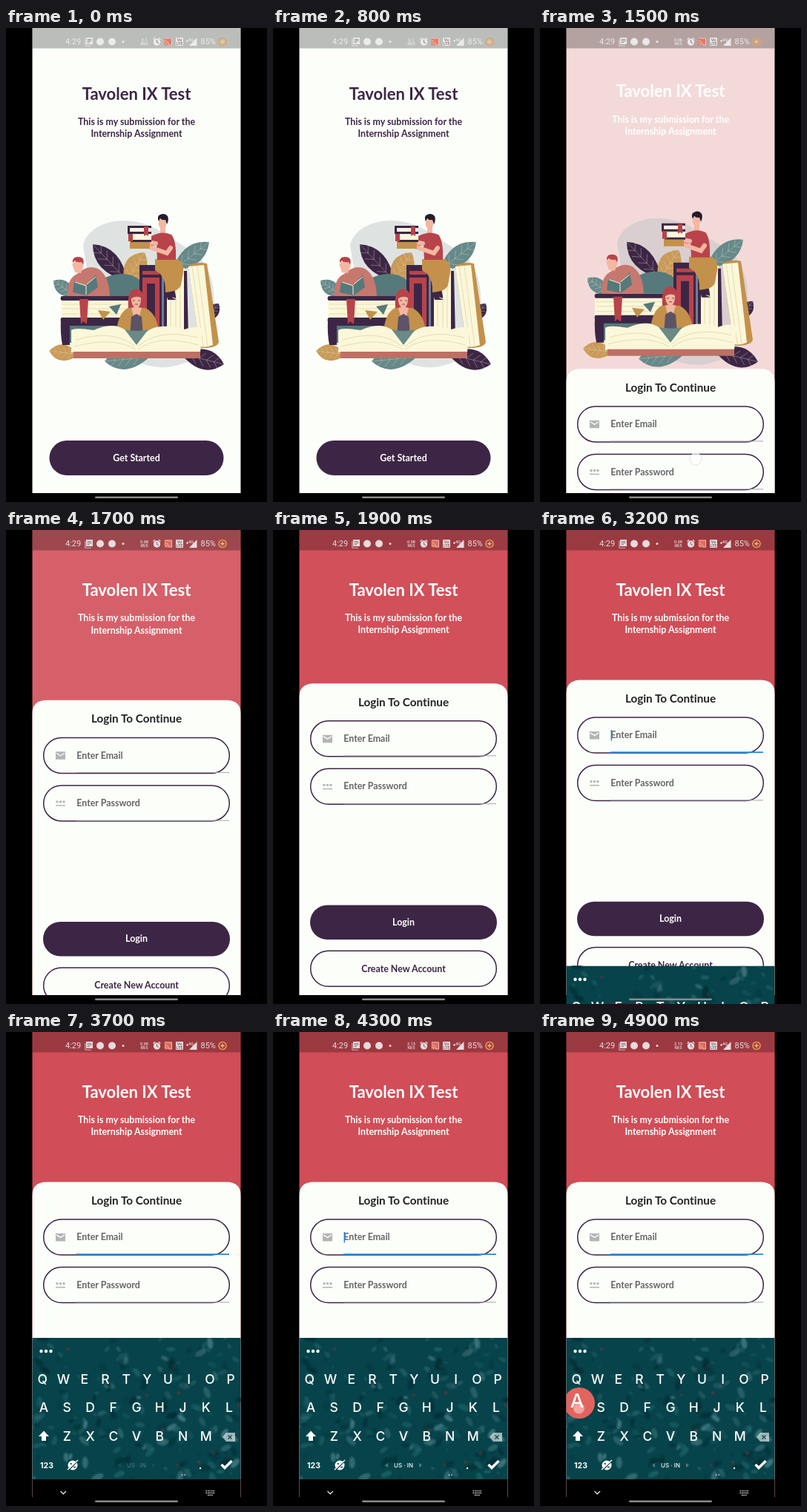
Recreate the animation shown at these times as an HTML page. Size 352 px wide and 640 px high, loop 5000 ms.

```html
<!DOCTYPE html>
<html lang="en">
<head>
<meta charset="utf-8">
<title>Login screen</title>
<style>
html, body { margin: 0; width: 100%; height: 100%; overflow: hidden; background: #000; }
svg { display: block; width: 100%; height: 100%; }
text { font: 700 12.4px Lato, sans-serif; text-anchor: middle; font-variant-ligatures: none; }
.box { fill: none; stroke: #3d2645; stroke-width: 1.5; }
.hint { fill: #666; text-anchor: start; }
.icon { fill: #b4b4b4; }
#status text { font: 400 11px Roboto, sans-serif; text-anchor: start; }
#status text.tiny { font: 500 5.5px Roboto, sans-serif; text-anchor: middle; }
#keys text { font: 500 17.5px Inter, sans-serif; }
.p { fill: #3d2645; } .t { fill: #56797b; } .c { fill: #fbf7da; }
.r { fill: #b8434b; } .o { fill: #c3914b; } .s { fill: #f3b7a2; }
.line { fill: none; stroke: #d9c98f; stroke-width: .6; }
</style>
</head>
<body>
<svg viewBox="0 0 352 640">
  <clipPath id="app"><rect x="35.5" width="281" height="628"/></clipPath>
  <clipPath id="wide"><rect x="35.5" width="281" height="640"/></clipPath>
  <filter id="soft"><feGaussianBlur stdDeviation="1.3"/></filter>

  <g clip-path="url(#app)">
    <rect id="back" x="35" width="283" height="628"/>
    <g id="page">
      <g id="head">
        <text x="176" y="96.5" style="font-size:22px">Tavolen IX Test</text>
        <text x="176" y="131">This is my submission for the</text>
        <text x="176" y="147.3">Internship Assignment</text>
      </g>

      <path fill="#b9c0c4" fill-opacity=".45" d="M104 294C108 270 140 256 172 261C205 266 225 288 250 300C272 314 284 345 280 385C278 425 262 448 232 455C205 463 180 455 160 440L110 330Z"/>
      <g id="leaves"></g>

      <!-- books lying on the left -->
      <rect class="t" x="76" y="398" width="106" height="27"/>
      <path class="p" d="M74 395H182V402H86V428H76Q73 412 74 395Z"/>
      <rect class="c" x="74" y="367" width="108" height="26"/>
      <path class="line" d="M76 373H182M76 379H182M76 386H182"/>
      <path class="p" d="M75 362H182V368H75Q72 365 75 362M75 391H182V398H75Q72 394 75 391"/>
      <path class="r" d="M99 366H111L109 400L104 396L101 400Z"/>
      <path class="o" d="M124 381L141 383L131 394Z"/>
      <path class="t" d="M139 376L155 373L149 387Z"/>

      <!-- reader -->
      <path class="t" d="M134 337Q152 329 170 334L185 342V362H126Z"/>
      <path fill="#c6786f" d="M83 362Q82 338 96 332Q110 319 124 325Q139 334 140 362Z"/>
      <path class="s" d="M89 318L93 330L101 331L105 320Z"/>
      <circle class="s" cx="97" cy="320" r="6.5"/>
      <path class="r" d="M90 317Q89 309 97 309Q107 309 104 320L102 316Q95 317 93 314Z"/>
      <path class="t" d="M92 342L108 348L121 333L124 350L109 361L90 357Z"/>
      <path fill="none" stroke="#fbf7da" d="M93 343L108 348V360M109 346L121 336"/>

      <!-- standing books -->
      <path class="o" d="M246 321Q258 315 271 318L287 424Q285 433 261 432Z"/>
      <path class="c" d="M246 322L267 320L279 428Q270 432 261 430Z"/>
      <path class="line" d="M251 322L266 430M258 321L272 430"/>
      <rect class="c" x="215" y="324" width="26" height="92"/>
      <path class="line" d="M222 325V410M229 325V410M235 325V410"/>
      <path class="p" d="M240 328H244L246 418H240ZM180 320H217V416H180Z"/>
      <path class="r" d="M184 328H207V333H184ZM184 337H207V408H184Z"/>
      <path class="p" d="M190 345H201V392H190Z"/>
      <path fill="#6c7f95" d="M210 324H213V414H210Z"/>

      <!-- sitter with books -->
      <path class="p" d="M215 354H222L224 364L230 367H218ZM221 352H227L229 362L229 365L223 363Z"/>
      <path class="o" d="M201 312H231Q241 317 239 330L236 347Q234 354 222 356L215 357Q216 341 208 332L201 327Z"/>
      <path class="s" d="M208 264H215V279H208Z"/>
      <path class="r" d="M196 281Q211 273 223 279Q230 287 229 313H204L203 294L194 294Z"/>
      <path fill="none" stroke="#f3b7a2" stroke-width="6" stroke-linecap="round" d="M222 297L217 304L188 294M202 291L196 290"/>
      <ellipse class="s" cx="211" cy="264" rx="5.3" ry="7"/>
      <path fill="#241c2c" d="M206 261Q203 254 208 252Q214 249 218 254Q220 259 217 265L215 259Q210 260 208 257Z"/>
      <path class="c" d="M166 268H195V276H166ZM169 279H196V287H169Z"/>
      <path class="p" d="M164 267H196V270H167V275H196V278H164ZM168 286H196V289H168Z"/>
      <path class="r" d="M186 268H192V281L189 279L186 281ZM165 278H171V288H165Z"/>
      <path class="o" d="M167 289H194V298H167Z"/>

      <!-- open book and its reader -->
      <path class="o" d="M149 409Q152 382 167 377H185Q203 383 206 409Z"/>
      <path class="r" d="M165 378Q163 353 175 352Q188 353 187 378Z"/>
      <path class="s" d="M169 362Q175 357 182 362Q183 375 176 379Q168 376 169 362ZM169 378L176 376L183 378L180 389H172Z"/>
      <path class="r" d="M168 366Q169 356 176 355Q183 357 183 365Q176 360 168 366Z"/>
      <path fill="none" stroke="#50333d" stroke-width=".8" d="M171 368H174M178 368H181M174 373H178"/>
      <path fill="#5d5367" d="M169 390L176 386L183 390L185 416H167Z"/>
      <path class="c" d="M88 408Q93 404 118 408Q142 397 158 406Q170 411 176 426Q188 404 210 403Q226 402 240 407Q254 402 265 405L262 438H88Z"/>
      <path fill="#6a8987" d="M160 407Q176 411 192 407L176 428Z"/>
      <path class="line" d="M94 421Q145 406 174 430M92 430Q145 416 175 434M258 418Q205 405 178 430M260 428Q205 413 178 434"/>
      <rect fill="#bd7064" x="91" y="437" width="171" height="9"/>

      <rect class="p" x="58.5" y="557" width="235" height="47" rx="23.5"/>
      <text x="176" y="584.5" fill="#fff">Get Started</text>
    </g>

    <g id="sheet">
      <path fill="#fcfefa" d="M35 640V20Q35 0 55 0H297Q317 0 317 20V640Z"/>
      <text x="176" y="30.5" fill="#222" style="font-size:15.3px">Login To Continue</text>
      <rect class="box" x="50.7" y="50.7" width="250.6" height="48" rx="24"/>
      <rect class="box" x="50.7" y="115.2" width="250.6" height="48" rx="24"/>
      <path stroke="#a9a3ab" d="M95 162.5H301"/>
      <path id="underline" d="M95 97.7H301"/>
      <path class="icon" d="M67 69.5H80V80H67Z"/>
      <path fill="none" stroke="#fcfefa" stroke-width="1.3" d="M68 71.5L73.5 75L79 71.5"/>
      <g class="icon">
        <circle cx="69" cy="137.2" r="1.7"/><circle cx="73.5" cy="137.2" r="1.7"/><circle cx="78" cy="137.2" r="1.7"/>
        <path d="M67 141.5H80V143H67Z"/>
      </g>
      <text class="hint" x="95.3" y="79">Enter Email</text>
      <text class="hint" x="95.3" y="143.3">Enter Password</text>
      <path id="caret" stroke="#2b86d9" stroke-width="1.5" d="M96.3 67.5V82"/>
      <rect class="p" x="50" y="299.3" width="252" height="46.5" rx="23.2"/>
      <text x="176" y="326.5" fill="#fff">Login</text>
      <rect class="box" x="50.7" y="361.2" width="250.6" height="48" rx="24"/>
      <text x="176" y="389.5" fill="#3d2645">Create New Account</text>
    </g>

    <circle id="tap" cx="210" cy="582" r="8" fill="#fff" fill-opacity=".7" stroke="#e6e3ee"/>

    <rect x="35" width="283" height="27.5" fill-opacity=".26"/>
    <g id="status" fill="#f2f2f2" opacity=".88">
      <text x="80" y="22">4:29</text>
      <path d="M108 13H117V22H108ZM106.5 15H107.3V23.7H115V24.5H106.5Z"/>
      <path stroke="#8c8084" d="M109.5 15.5H115.5M109.5 17.5H115.5M109.5 19.7H113"/>
      <circle cx="127" cy="18.5" r="5"/><circle cx="143" cy="18.5" r="5"/>
      <circle cx="158" cy="18.5" r="1.5"/>
      <text id="speed" class="tiny" x="186.5" y="17.5"></text>
      <text class="tiny" x="186.5" y="23" style="font-size:4.5px">KB/S</text>
      <circle cx="203.5" cy="19" r="4.7"/>
      <path fill="none" stroke="#f2f2f2" stroke-width="1.3" d="M198.5 15.5L201 13.3M206 13.3L208.5 15.5"/>
      <path fill="none" stroke="#8c6a6d" d="M203.5 16V19.5L206 20.5"/>
      <rect x="213.5" y="13.5" width="10.5" height="10" rx="1" fill="#e8735f"/>
      <path fill="none" stroke="#f4d2c8" d="M214 14H223.5V23H220M214 17Q219 18 219.5 23M214 20Q216.5 20.5 217 23"/>
      <rect x="229" y="13" width="10" height="11" rx="1"/>
      <text class="tiny" x="234" y="18" fill="#7d5a5e">Vo</text><text class="tiny" x="234" y="23" fill="#7d5a5e">LTE</text>
      <path d="M257.5 13V24H247ZM243 17H246V18H243ZM244 16H245V19H244Z"/>
      <text class="tiny" x="249.5" y="17.5">4G</text>
      <text x="262.5" y="22">85%</text>
      <circle cx="292" cy="18.5" r="5" fill="none" stroke="#f0a04b" stroke-width="1.7"/>
      <path d="M291.3 15.7H292.7V17.8H294.8V19.2H292.7V21.3H291.3V19.2H289.2V17.8H291.3Z" fill="#f5cf9a"/>
    </g>
  </g>

  <g clip-path="url(#wide)">
    <g id="board">
      <rect x="35" y="413" width="283" height="192" fill="#07434a"/>
      <clipPath id="panel"><rect x="35" y="413" width="283" height="191"/></clipPath>
      <g clip-path="url(#panel)"><g id="foliage" filter="url(#soft)"></g></g>
      <rect x="35" y="604" width="283" height="40"/>
      <g id="keys" fill="#fff">
        <circle cx="47.5" cy="431" r="2.2"/><circle cx="54" cy="431" r="2.2"/><circle cx="60.5" cy="431" r="2.2"/>
        <path d="M51 538.5L58 546H54V552H48V546H44Z"/>
        <path fill-opacity=".6" d="M292 547L297 541H309V553H297Z"/>
        <path stroke="#17454b" stroke-width="1.3" d="M299.5 544.5L304.5 549.5M304.5 544.5L299.5 549.5"/>
        <text x="55" y="589" style="font-size:10.5px;font-weight:700">123</text>
        <circle cx="90" cy="585" r="6.5"/>
        <path stroke="#0a3f46" stroke-width="1.6" d="M85 591L96 580M86.5 583H89M91 587.5H94"/>
        <path stroke="#fff" stroke-width="1.4" d="M83 591L97 578"/>
        <g id="locale">
          <text x="176" y="588" style="font-size:8px">US · IN</text>
          <path fill-opacity=".3" d="M155 582V588L151 585ZM197 582V588L201 585Z"/>
        </g>
        <circle cx="262" cy="589" r="1.2"/><circle cx="237.5" cy="598" r=".8"/><circle cx="241" cy="598" r=".8"/>
        <path fill="none" stroke="#fff" stroke-width="3.5" d="M290.5 584L295 588.5L304.5 579"/>
        <path fill="none" stroke="#ddd" stroke-width="1.4" d="M73.5 620L77.2 623.7L81 620"/>
        <path fill="none" stroke="#ccc" stroke-width="1.7" stroke-dasharray="1.5 1" d="M269.5 619.5H281M269.5 622.3H281M272 625.3H279"/>
      </g>
      <g id="press">
        <circle cx="53" cy="501" r="21" fill="#e2645f"/>
        <circle cx="52.5" cy="508" r="7.5" fill="#f3a5a0"/>
        <text x="50" y="507" fill="#fff" style="font:500 26px Inter,sans-serif">A</text>
      </g>
    </g>
  </g>
  <rect x="120" y="632.5" width="112" height="2.6" rx="1.3" fill="#8b8b8b"/>
</svg>
<script>
const $ = id => document.getElementById(id);
const LOOP = 5000, OPEN = 1439, FOCUS = 3100, SLIDE = 3120;
const clamp = v => Math.min(1, Math.max(0, v));
const show = (id, on) => $(id).setAttribute('visibility', on ? 'visible' : 'hidden');
const shift = (id, y) => $(id).setAttribute('transform', `translate(0 ${y})`);

// CSS-style cubic-bezier easing, solved by bisection
function bezier(x1, y1, x2, y2) {
  const at = (a, b, s) => 3 * (1 - s) ** 2 * s * a + 3 * (1 - s) * s * s * b + s ** 3;
  return x => {
    if (x <= 0 || x >= 1) return clamp(x);
    let lo = 0, hi = 1;
    for (let i = 0; i < 30; i++) {
      const mid = (lo + hi) / 2;
      if (at(x1, x2, mid) < x) lo = mid; else hi = mid;
    }
    return at(y1, y2, lo);
  };
}
const settle = bezier(.18, 1, .04, 1), glide = bezier(.4, 0, .2, 1);

// Leaf from stem (x, y) to tip (u, v) with midrib and veins
function leaf(x, y, u, v, w, color) {
  const len = Math.hypot(u - x, v - y), nx = (y - v) / len, ny = (u - x) / len;
  const mx = x + (u - x) * .6, my = y + (v - y) * .6;
  let veins = `M${x} ${y}L${u} ${v}`;
  for (let k = .25; k < .8; k += .17) {
    for (const side of [-1, 1]) {
      const d = side * w * .32, f = k + .13;
      veins += `M${x + (u - x) * k} ${y + (v - y) * k}L${x + (u - x) * f + nx * d} ${y + (v - y) * f + ny * d}`;
    }
  }
  const side = d => `${mx + nx * d} ${my + ny * d}`;
  return `<path fill="${color}" d="M${x} ${y}Q${side(w)} ${u} ${v}Q${side(-w)} ${x} ${y}Z"/>
    <path fill="none" stroke="#e9dfca" stroke-opacity=".6" stroke-width=".6" d="${veins}"/>`;
}
const plum = '#3d2645', teal = '#66898a', tan = '#c99a58';
$('leaves').innerHTML = [
  [164, 342, 117, 292, 26, plum], [160, 346, 187, 303, 29, tan], [224, 328, 274, 289, 25, teal],
  [94, 363, 64, 341, 19, teal], [268, 397, 287, 372, 17, plum], [236, 440, 294, 454, 27, plum],
  [194, 444, 133, 450, 27, teal], [99, 441, 58, 436, 22, tan]
].map(a => leaf(...a)).join('');

let seed = 7;
const rnd = () => (seed = seed * 16807 % 2147483647) / 2147483647;
let spots = '';
for (let i = 0; i < 190; i++) {
  const x = 35 + rnd() * 283, y = 413 + rnd() * 191, rx = 2 + rnd() * 7;
  const berry = i % 16 == 0;
  const color = berry ? '#8c3438' : ['#4f858b', '#022a31', '#22666c'][i % 3];
  spots += `<ellipse cx="${x}" cy="${y}" rx="${berry ? 2 : rx}" ry="${berry ? 2 : rx * .5}" fill="${color}"
    opacity="${.25 + rnd() * .5}" transform="rotate(${rnd() * 180} ${x} ${y})"/>`;
}
$('foliage').innerHTML = spots;

const row = (letters, x, step, y) =>
  [...letters].map((c, i) => `<text x="${x + i * step}" y="${y}">${c}</text>`).join('');
$('keys').insertAdjacentHTML('beforeend',
  row('QWERTYUIOP', 49.3, 28.2, 474.5) + row('ASDFGHJKL', 51, 31.25, 513) + row('ZXCVBNM', 82.3, 31.25, 551.5));

const white = [252, 254, 250], red = [209, 77, 87];

function draw(t) {
  const p = settle((t - OPEN) / 909), tint = p ** 1.8;
  $('back').setAttribute('fill', `rgb(${white.map((v, i) => Math.round(v + (red[i] - v) * tint))})`);
  $('head').setAttribute('fill', t < OPEN ? plum : '#fff');
  shift('page', -8 * p);
  shift('sheet', 640 - 437.6 * p);
  show('tap', t >= 1350 && t < 1580);

  const focused = t >= FOCUS;
  $('underline').setAttribute('stroke', focused ? '#2b86d9' : '#a9a3ab');
  $('underline').setAttribute('stroke-width', focused ? 1.8 : 1);
  show('caret', focused && (t - FOCUS) % 1000 < 500);

  shift('board', 227 * (1 - glide((t - SLIDE) / 330)));
  show('board', t >= SLIDE);
  $('locale').setAttribute('opacity', .25 + .75 * clamp((t - 3700) / 300));
  show('press', t >= 4850);
  $('speed').textContent = t < 1300 ? '0.1' : t < 2000 ? '0.08' : t < 3800 ? '0.09' : '2.13';
}

const begin = performance.now();
function tick() {
  draw((performance.now() - begin) % LOOP);
  requestAnimationFrame(tick);
}
tick();
</script>
</body>
</html>
```
